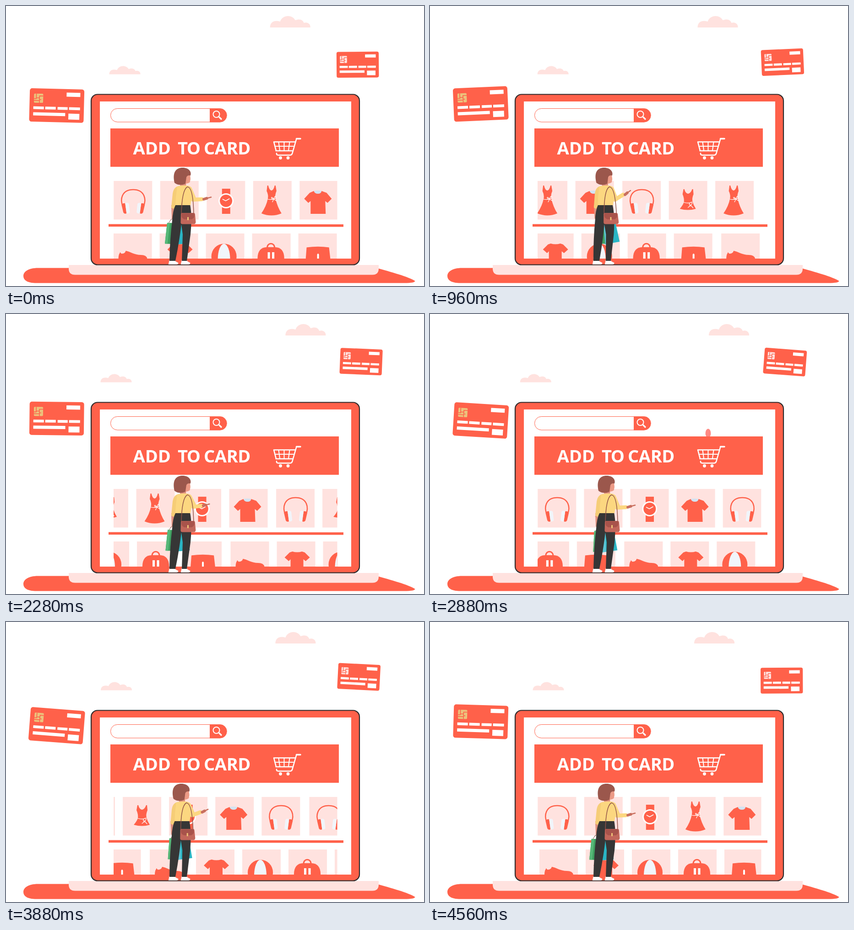
Animation, 913 px wide and 613 px high, one loop 4600 ms. Source, as an HTML page:

```html
<!DOCTYPE html>
<html lang="en">
<head>
<meta charset="utf-8">
<title>Online shop</title>
<style>
html, body { margin: 0; width: 100%; height: 100%; overflow: hidden; background: #fff; }
svg { display: block; width: 100%; height: 100%; }
text { font: 700 38px "Open Sans", "Noto Sans", sans-serif; fill: #fff; }
.red { fill: #ff614a; }
.pink { fill: #ffe2df; }
.line { fill: none; stroke: #ff614a; }
.white { fill: #fff; }
.pen { fill: none; stroke: #fff; stroke-linecap: round; stroke-linejoin: round; }
</style>
</head>
<body>
<svg viewBox="0 0 913 613">
  <defs>
    <clipPath id="shelf1"><rect x="235" y="380" width="488.500" height="90"/></clipPath>
    <clipPath id="shelf2"><rect x="235" y="495" width="488.500" height="58"/></clipPath>

    <path id="cloud" class="pink" d="M0 25C0 13 9 8 22 12C27-3 48-4 55 9C66 5 72 9 74 15C82 12 89 18 88 25Z"/>

    <g id="card">
      <rect class="red" x="-59.500" y="-36.500" width="119" height="73" rx="5"/>
      <rect x="-50" y="-25" width="20" height="20" rx="2" fill="currentColor"/>
      <path class="line" stroke-width="1.600" d="M-45-25V-14H-50M-45-16H-38V-10H-50M-38-16V-20H-30M-38-10V-5M-38-12H-34"/>
      <path class="white" d="M21-29h30v9h-30zM-51 3h23v6h-23zM-25 3h23v6h-23zM2 3h22v6h-22zM27 3h24v6h-24zM-51 16h70v7h-70zM26 17h24v13h-24z"/>
    </g>

    <g id="phones">
      <path class="line" stroke-width="2.500" d="M20 55C13 42 17 19 42.500 19S72 42 65 55"/>
      <g id="cup">
        <path class="red" d="M17 52Q20 48 25 49L28 71Q23 73 21 69Z"/>
        <path fill="#f1f5fb" d="M25 49Q30 46 33 50L35 68Q34 72 28 71Z"/>
      </g>
      <use href="#cup" transform="matrix(-1 0 0 1 85 0)"/>
    </g>
    <g id="watch">
      <rect class="red" x="33.500" y="17" width="18" height="55"/>
      <circle class="white" cx="42.300" cy="43.500" r="16.500"/>
      <circle class="red" cx="42.300" cy="43.500" r="13.500"/>
      <path class="pen" stroke-width="1.500" d="M35 40L41.500 43.500L49.500 39"/>
    </g>
    <g id="dress">
      <path class="red" d="M31 10H33Q35 20 40 21Q45 20 47 10H49L51 22Q47 31 49 39Q53 57 62 71Q40 80 18 71Q29 55 32 39Q34 31 29.500 22Z"/>
      <path class="pen" stroke-width="1.200" d="M32 40Q41 42 49 38M45 40Q39 39 40 36Q42 35 45 40Q47 32 50 34Q50 38 45 40L42 46M45 40L52 44"/>
    </g>
    <g id="top">
      <path class="red" d="M32 18H34Q36 27 42 28Q48 27 51 18H53L54 29Q50 38 52 46Q54 53 59 61Q42 66 24 61Q31 53 33 46Q34 38 30 29Z"/>
      <path class="pen" stroke-width="1.200" d="M33 47Q44 50 51 46M47 55Q43 51 46 48Q51 45 51 49Q49 53 42 58M47 52L53 59"/>
    </g>
    <g id="shirt">
      <path fill="#d3e3f2" d="M31 22Q40 20 48 22L46 29H34Z"/>
      <path class="red" d="M31 22Q33 28 40 28T48 22L59 26L70 39L61 48L56 44L57 72H24V44L19 48L10 39L22 26Z"/>
    </g>
    <path id="shoe" class="red" d="M11 56Q11 46 14 43Q14 39 17 44Q25 45 27 38C35 39 46 47 60 47Q73 47 74 56Z"/>
    <path id="tee" class="red" d="M34 22Q44.500 25 55 22L61 24L72 35L63 43L58 39V57H30V39L26 43L17 35L28 24Z"/>
    <g id="ball">
      <circle class="red" cx="39.500" cy="50" r="27.500"/>
      <ellipse cx="39.500" cy="57" rx="13.500" ry="34.500" fill="#f1f5fb"/>
    </g>
    <g id="duffel">
      <path class="line" stroke-width="3" d="M33 32C32 19 50 19 49 32"/>
      <path class="red" d="M12 57C11 39 19 30 32 30H50C63 30 71 39 70 57Z"/>
      <path class="white" d="M34 41h5v16h-5zM43.500 41h5v16h-5z"/>
    </g>
    <g id="shorts">
      <path class="red" d="M18 30.500Q43 27 67 30.500L70 57H16Z"/>
      <path class="white" d="M41 57V46Q43 42 45 46V57Z"/>
    </g>
  </defs>

  <use id="cloudA" href="#cloud"/>
  <use id="cloudB" href="#cloud"/>

  <path class="red" d="M137 573.500H70C48 573.500 38 582 38 591C38 602 50 606.500 66 606.500H870Q893 606.500 893.500 602C880 593 840 582 808 573Z"/>
  <path class="pink" d="M137 567H814V575Q814 588.500 800 588.500H151Q137 588.500 137 575Z"/>
  <rect x="186" y="193.500" width="586" height="373" rx="14" class="red" stroke="#2c2a2b" stroke-width="2.200"/>
  <rect class="white" x="205" y="209" width="549" height="344"/>

  <path class="red" d="M445 224.500H467.500A14.800 14.800 0 0 1 467.500 254.500H445Z"/>
  <rect class="line" x="228.500" y="224.500" width="253.500" height="29.500" rx="14.700"/>
  <circle class="pen" stroke-width="2" cx="459.500" cy="237" r="7"/>
  <path class="pen" stroke-width="3.200" d="M466 243.500L470 247.500"/>

  <ellipse id="drop" cx="607.500" cy="261" rx="6" ry="9.800" fill="#ff8983"/>
  <rect class="red" x="228" y="268" width="499" height="84"/>
  <text x="277.500" y="324.500">ADD</text>
  <text x="375" y="324.500" letter-spacing="-1.500">TO</text>
  <text x="432" y="324.500" letter-spacing="-.4">CARD</text>
  <g class="pen" stroke-width="2.600">
    <path stroke-width="3.400" d="M643 290.500H634.500"/>
    <path d="M634.500 290.500L625.500 322Q624.500 326.500 620 326.500H595Q590 326 591 322.500M585 297.500H631M589.500 317H626.500M585 297.500L590 317"/>
    <path stroke-width="2" d="M587 307H628M595.500 298L598 316M607.500 298V316M619.500 298L617 316"/>
  </g>
  <circle class="white" cx="599.500" cy="332.500" r="3.400"/>
  <circle class="white" cx="616" cy="332.500" r="3.400"/>

  <g clip-path="url(#shelf1)"><g id="row1"></g></g>
  <path class="red" d="M224 477.500L737 478V483.500L224 483Z"/>
  <g clip-path="url(#shelf2)"><g id="row2"></g></g>

  <g id="bags">
    <path fill="none" stroke="#8f5a4d" d="M345 470Q353 457 362 461Q370 462 374 473"/>
    <path fill="#2ab5c4" d="M357 470L384 474L386 518H353Z"/>
    <path fill="#5cc6d6" d="M357 470L366 471L361 518H353Z"/>
    <path fill="#3f9f60" d="M342 469L358 471L354 517L333 514Z"/>
    <path fill="#57b878" d="M342 469L348 470L339 515L333 514Z"/>
  </g>
  <g id="woman">
    <path fill="#e0917f" d="M361 436H368L369 462Q366 469 362 465Z"/>
    <path fill="#f6cd77" d="M378 394Q366 396 364 411L361 441Q365 446 371 442L378 416Z"/>
    <path class="white" stroke="#e8e4e4" stroke-width=".5" d="M357 556H368Q370 560 376 562Q377 565.500 372 565.500H355ZM384 556H394Q396 560 402 562Q403 565.500 398 565.500H382Z"/>
    <path fill="#363636" d="M371 434H402Q407 460 403 500L395 558H384L386 500L383 478Q378 520 370 558H357Q358 510 363 470Q364 448 371 434Z"/>
    <path fill="#e0917f" d="M381 384H394L393 394Q386 398 380 393Z"/>
    <path fill="#fcd780" d="M374 395Q388 391 400 394Q408 398 407 410L403 436H370L371 418Z"/>
    <path fill="#ec9a86" d="M391 368L402 368L403 379L401.500 386Q396 390 390 388Z"/>
    <path fill="#9b574c" d="M368 387C363 364 371 354 386 354C399 354 406 363 403 371Q396 370 394 375L392 389Q378 395 368 387Z"/>
  </g>
  <path id="sleeve1" fill="none" stroke="#fcd780" stroke-width="12.500" stroke-linecap="round"/>
  <path id="sleeve2" fill="none" stroke="#fcd780" stroke-width="8.500" stroke-linecap="round"/>
  <path id="palm" fill="none" stroke="#c9705f" stroke-width="6" stroke-linecap="round"/>
  <path id="finger" fill="none" stroke="#c9705f" stroke-width="2.600" stroke-linecap="round"/>
  <g id="purse">
    <path fill="none" stroke="#8f5147" stroke-width="1.500" d="M383 457Q384 403 396 396Q409 396 410 457"/>
    <path fill="#c2675b" d="M385 453H410Q413 453 413 457L414.500 473Q414 477.500 410 477.500H386Q381 477.500 381.500 473L382 457Q382 453 385 453Z"/>
    <path fill="#a8534b" d="M384 453.500H411Q414 464 405 467H390Q381 464 384 453.500Z"/>
    <rect x="396" y="462" width="3" height="7" rx="1" fill="#f0c377"/>
  </g>

  <use id="cardA" href="#card" color="#ecc37c"/>
  <use id="cardB" href="#card" color="#ffe2df"/>
</svg>
<script>
const LOOP = 4600, BEAT = LOOP / 3, PAGE = 508.5, BELT = 507.5;
const $ = id => document.getElementById(id);
const set = (id, name, value) => $(id).setAttribute(name, value);
const move = (id, value) => set(id, "transform", value);
const ease = u => (1 - Math.cos(Math.PI * Math.min(1, Math.max(0, u)))) / 2;
const wave = (t, peak) => Math.cos(2 * Math.PI * (t - peak) / LOOP);
const mix = (a, b, u) => a + (b - a) * u;

const pages = [
  ["phones", "top", "watch", "dress", "shirt"],
  ["phones", "top", "dress", "watch", "shirt"],
  ["phones", "top", "watch", "shirt", "phones"]
];
const belt = ["shoe", "tee", "ball", "duffel", "shorts"];
const tile = (name, x, y) => `<g transform="translate(${x} ${y})">` +
  `<rect class="pink" width="84" height="84.500"/><use href="#${name}"/></g>`;

$("row1").innerHTML = [0, 1, 2, 3].map(p => pages[p % 3].map((name, i) =>
  tile(name, p * PAGE + i * (p === 2 ? 101.1 : 101.5), 383)).join("")).join("");
$("row2").innerHTML = [-1, 0, 1, 2].map(p => belt.map((name, i) =>
  tile(name, p * BELT + i * 101, 498)).join("")).join("");

// Keys are [time, ...values] within one beat; the first key closes the cycle.
function track(keys, t) {
  const all = [...keys, [BEAT, ...keys[0].slice(1)]];
  const n = all.findIndex(k => k[0] > t);
  const a = all[n - 1], b = all[n];
  const u = ease((t - a[0]) / (b[0] - a[0]));
  return a.slice(1).map((v, i) => mix(v, b[i + 1], u));
}

const leanKeys = [[0, 0], [67, 0], [453, 8], [960, -5], [1347, 0]];
const bagKeys = [[0, 9.5, 4, -5], [67, 9.5, 4, -5], [453, 0, 0, 0], [1020, 20, 3, -10], [1173, 19, 3, -10], [1347, 16, 3, -8]];
// elbow, wrist and fingertip
const rest = [411, 424, 431, 423, 448, 418.5];
const armKeys = [[0, ...rest], [67, ...rest], [453, 421, 419, 438, 431, 455, 436], [960, 406, 424, 425, 413, 438, 404], [1173, ...rest]];

function draw(t) {
  const slow = 1 - wave(t, 210);
  move("cloudA", `translate(${576 + 17.6 * slow} 22)`);
  move("cloudB", `translate(${215.7 + 19.6 * wave(t, 770)} 131.500) scale(.773 .72)`);
  move("cardA", `translate(110.800 ${223.5 - 9.7 * wave(t, 700)}) rotate(${1.1 - 3.8 * wave(t, 1220)})`);
  move("cardB", `translate(${768 + 3.9 * slow} ${129 - 12.7 * slow}) rotate(${1 - 3.6 * wave(t, 850)}) scale(.775)`);

  const turned = [420, 1940, 3640].reduce((sum, s) => sum + ease((t - s) / 920), 0);
  move("row1", `translate(${235.3 - PAGE * turned} 0)`);
  move("row2", `translate(${234.7 - BELT * t / LOOP} 0)`);

  const pop = Math.max(0, 1 - Math.abs(t - 2880) / 110);
  set("drop", "ry", 9.8 * pop);
  set("drop", "rx", 6 * pop);

  const beat = t % BEAT;
  const [lean] = track(leanKeys, beat);
  const k = lean / 187;
  const skew = `matrix(1 0 ${-k} 1 ${560 * k} 0)`;
  move("woman", skew);
  move("purse", skew);

  const [bx, by, turn] = track(bagKeys, beat);
  move("bags", `translate(${bx} ${by}) rotate(${turn} 362 464)`);

  const [ex, ey, wx, wy, fx, fy] = track(armKeys, beat);
  const sx = 400 + k * 160;
  set("sleeve1", "d", `M${sx} 401L${ex - 2} ${ey - 2}`);
  set("sleeve2", "d", `M${ex - 2} ${ey}L${wx - 3} ${wy}`);
  const px = mix(wx, fx, .45), py = mix(wy, fy, .45);
  set("palm", "d", `M${wx + 1} ${wy}L${px} ${py}`);
  set("finger", "d", `M${px} ${py}L${fx} ${fy}`);
}

const start = performance.now();
function tick() {
  draw((performance.now() - start) % LOOP);
  requestAnimationFrame(tick);
}
tick();
</script>
</body>
</html>
```
